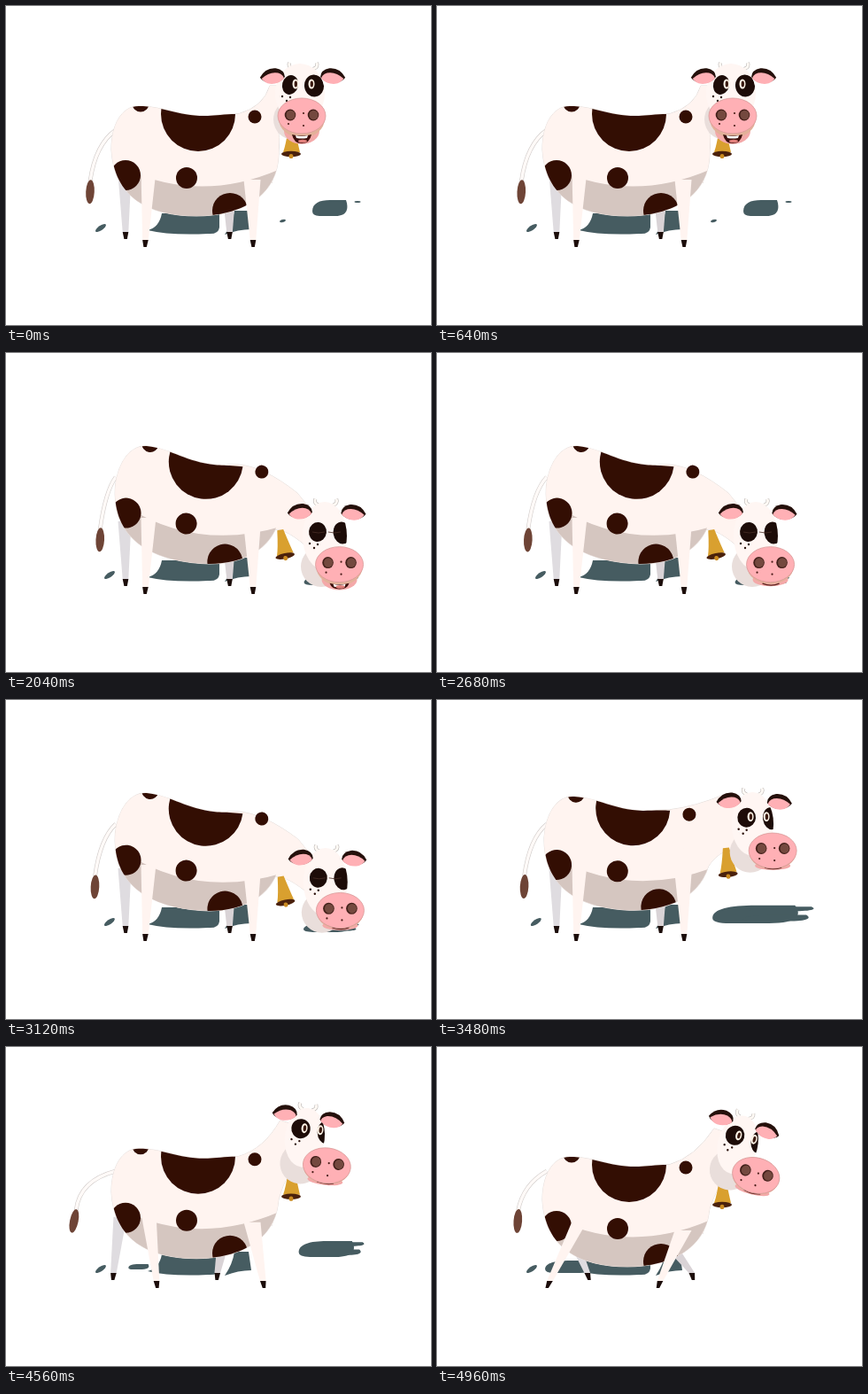
An HTML page with a canvas for the animation above (5 s loop, 480 px wide and 360 px high).

```html
<!DOCTYPE html>
<html lang="en">
<head>
<meta charset="utf-8">
<title>Cow</title>
<style>
html, body { margin: 0; width: 100%; height: 100%; overflow: hidden; background: #fff; }
canvas { display: block; }
</style>
</head>
<body>
<canvas id="stage" width="480" height="360"></canvas>
<script>
const ctx = document.getElementById('stage').getContext('2d');
const LOOP = 5000;
const HIDE = '#fff4f0', SHADE = '#d5c6c0', DARK = '#330e03', PINK = '#ffb0b5', SHADOW = '#465c61';

const TORSO = new Path2D(`M119 162 C119 135 130 113 150 113 C178 113 195 125 228 124
  C250 123 312 110 308 165 C308 215 265 237 215 237 C160 237 122 215 119 162 Z`);
const SPOTS = [[217, 122, 42], [204, 194, 12], [135, 191, 17], [253, 231, 20], [152, 110, 9.5]];

const clamp = v => Math.max(0, Math.min(1, v));
// Smooth 0 to 1 between two times
const ease = (t, from, to) => {
  const s = clamp((t - from) / (to - from));
  return s * s * (3 - 2 * s);
};
// Smooth 0 to 1 to 0 around a time
const bump = (t, mid, half) => Math.cos(clamp(Math.abs(t - mid) / half) * Math.PI / 2) ** 2;

function pose(t) {
  const bend = ease(t, 1080, 1700) - ease(t, 3080, 3860);
  const arc = Math.sin(Math.PI * bend);
  const look = ease(t, 700, 1120);
  const walk = ease(t, 4160, 5000);
  const phase = Math.max(0, t - 4000) / 1300 * 2 * Math.PI;
  const stride = Math.sin(phase);
  return {
    bend, arc, look, walk, stride,
    x: 334 + 9 * look + 22 * bend + 40 * bend * bend * arc + 6 * walk,
    y: 90 + 3 * look + 110 * bend ** 1.35 - 16 * bump(t, 300, 300),
    tilt: .25 * walk,
    turn: look - .45 * bend,
    mouth: 1 - ease(t, 1200, 3400),
    open: 1 - ease(t, 1150, 1350) + ease(t, 3200, 3450),
    drop: 11 * stride * stride * ease(t, 4160, 4660),
    lift: t > 4000 ? 18 * Math.max(0, stride) * Math.max(0, Math.cos(phase)) : 0,
    farStride: -stride * clamp((t - 4000) / 600),
    tailX: 95 + 16 * ease(t, 600, 1120) * clamp((4150 - t) / 3000)
      - 40 * (bump(t, 300, 300) + bump(t, 4720, 300)),
    backdrop: clamp(1.3 - Math.abs(t - 1440) / 250),
    shadowFade: 1 - ease(t, 4450, 4900)
  };
}

function fill(path, color) {
  ctx.fillStyle = color;
  ctx.fill(typeof path === 'string' ? new Path2D(path) : path);
}

function poly(color, ...pts) {
  fill('M' + pts.join('L') + 'Z', color);
}

function oval(x, y, rx, ry, color, angle = 0) {
  const path = new Path2D();
  path.ellipse(x, y, Math.max(0, rx), Math.max(0, ry), angle, 0, 7);
  fill(path, color);
  return path;
}

function line(d, color, width) {
  ctx.strokeStyle = color;
  ctx.lineWidth = width;
  ctx.stroke(new Path2D(d));
}

function within(place, paint) {
  ctx.save();
  place();
  paint();
  ctx.restore();
}

// The torso rocks forward around its middle as the neck bends
function rock(bend) {
  ctx.translate(215, 190);
  ctx.rotate(.13 * bend);
  ctx.translate(-215, -190);
}

function blob(x, y, w, h) {
  fill(`M${x - w} ${y + h * .4} C${x - w} ${y - h * .6} ${x - w * .6} ${y - h} ${x} ${y - h}
    H${x + w * .9} C${x + w * 1.05} ${y} ${x + w} ${y + h} ${x + w * .3} ${y + h}
    H${x - w * .6} Q${x - w} ${y + h} ${x - w} ${y + h * .4} Z`, SHADOW);
}

function drawShadows(p) {
  const x = 366, y = 228 + 29 * p.bend;
  const w = (20 + 24 * p.look + 20 * p.arc - 13 * p.bend) * p.shadowFade;
  const h = 9 + 3 * p.arc - 4 * p.bend;
  blob(x - w * .1 * p.look, y, w * (1 - .15 * p.look), h);
  blob(x + w * .4 * p.look, y - h * .6, w * .65 * p.look, h * .25);
  blob(x + w * .3 * p.look, y + h * .4, w * .65 * p.look, h * .35);
  oval(312.5, 242.5, 3.5 * (1 - p.look), 1.5 * (1 - p.look), SHADOW, -.3);
  oval(397, 221, 3.5 * (1 - p.look), 1 - p.look, SHADOW);
  fill('M160 253 Q173 250 176 234 H241 V250 Q240 258 228 257 Q185 259 160 253 Z', SHADOW);
  fill('M247 258 Q256 245 258 231 H274 L277 252 Q262 252 247 258 Z', SHADOW);
  oval(107 + 10 * p.bend, 250.5, 7, 2.6, SHADOW, -.6);
  const step = Math.abs(p.stride);
  blob(150, 248, 28 * step, 7 * step);
}

function drawBackdrop(alpha) {
  ctx.globalAlpha = alpha;
  poly('#8fb5c6', [305, 172], [323, 178], [317, 200], [314, 215], [316, 232], [290, 232], [299, 208]);
  poly('#8fb5c6', [373, 212], [396, 212], [398, 231], [378, 232]);
  poly('#8fb5c6', [121, 156], [126, 190], [118, 192], [116, 182]);
  ctx.globalAlpha = 1;
}

function drawTail({ tailX: x, stride, walk }) {
  const y = 211 - .02 * (103 - x) ** 2 - 12 * walk * stride * stride;
  const lean = Math.max(0, (94 - x) / 45);
  const d = `M124 140 Q${x + 6} ${156 - 14 * lean} ${x + 6 * lean} ${y - 12}`;
  line(d, '#cfcac8', 4.6);
  line(d, '#fffaf8', 3.4);
  oval(x, y, 4.8, 13.5, '#6e4436', .05 + lean * .4);
}

function drawLeg(x, y, w, fx, fy, color) {
  const lean = (fx - x) * .09, ankle = fx - lean, top = fy - 8;
  poly(color, [x - w / 2, y], [x + w / 2, y], [ankle + 3.4, top], [ankle - 3.2, top]);
  poly('#1c0d0a', [ankle - 3.2, top], [ankle + 3.4, top], [fx + 1.8, fy], [fx - 1.6, fy]);
}

function drawBody({ x, y, bend, look }) {
  const neck = new Path2D(`M250 ${123 + 3 * bend} L262 ${122 + 4 * bend}
    Q291 ${114 + 14 * bend} ${x - 36} ${y - 12 * look * (1 - bend) - 45 * bend}
    L${x} ${y} L${x - 27} ${y + 52 - 38 * bend}
    Q312 ${150 + 45 * bend} 300 200 Z`);
  const turned = () => rock(bend);
  ctx.strokeStyle = '#e3dcd9';
  ctx.lineWidth = 1;
  within(turned, () => ctx.stroke(TORSO));
  ctx.stroke(neck);
  within(turned, () => fill(TORSO, HIDE));
  fill(neck, HIDE);
  within(turned, () => {
    oval(281, 125, 7.5, 7.5, DARK);
    ctx.clip(TORSO);
    fill('M135 184 Q222 224 314 182 V270 H135 Z', SHADE);
    for (const [sx, sy, r] of SPOTS) oval(sx, sy, r, r, DARK);
  });
}

function drawBell(bend) {
  within(() => {
    ctx.translate(322 + 40 * bend * (1 - bend) - 6 * bend, 171 + 62 * bend);
    ctx.rotate(-.2 * bend);
  }, () => {
    fill('M-3 -34 H4 Q8 -14 10 -6 H-9 Q-6 -14 -3 -34 Z', '#d9a02f');
    oval(0, -4, 11, 3.2, '#4a210c');
    oval(0, -1.5, 2.4, 2.6, '#c98a20');
  });
}

function drawEar(x, y, side) {
  within(() => {
    ctx.translate(x, y);
    ctx.scale(side, 1);
    ctx.rotate(.08);
  }, () => {
    fill('M-14 3 Q-9 -9 3 -9 Q13 -8 14 0 Q9 8 -1 8 Q-10 8 -14 3 Z', '#25100b');
    fill('M-12 4 Q-4 -5 6 -4 Q13 -2 13 2 Q7 9 -2 9 Q-8 9 -12 4 Z', PINK);
  });
}

function drawMuzzle(turn, mouth) {
  oval(0, 17, 20, 5 + 10 * mouth, '#f4a9a9');
  oval(0, 3, 26, 18 + 4 * mouth, '#e3b199');
  if (mouth > .35) {
    const low = 21 + 10 * mouth;
    fill(`M-11 21 Q0 24 11 21 Q9 ${low} 0 ${low} Q-9 ${low} -11 21 Z`, '#3c100c');
    fill('M-7 22 Q0 24 7 22 L6 25 Q0 26 -6 25 Z', '#fff');
    oval(1, low - 2.5, 5, 1.8, '#e2807c');
  } else {
    line(`M-9 ${19 + 10 * mouth} Q1 ${22 + 14 * mouth} 10 ${19 + 10 * mouth}`, '#5a231c', 1.3);
  }
  const snout = oval(0, 0, 27, 20, PINK);
  ctx.strokeStyle = '#d99a98';
  ctx.lineWidth = .8;
  ctx.stroke(snout);
  for (const side of [-13, 13]) {
    oval(side, -1 - 2 * turn, 6.3, 6.5, '#43201a');
    oval(side + .5, -1 - 2 * turn, 5, 5.3, '#74493f');
  }
  for (const [x, y] of [[2, -3], [2, 11], [-15, 9]]) oval(x, y, 1.1, 1.1, '#4a1d18');
}

function drawFace({ turn, bend, mouth, open }) {
  const lift = 10 * bend, right = 26 - 11 * turn;
  oval(-9, 38, 23, 23, '#e9dedb');

  const hornY = -22 - 4 * turn - lift;
  for (const [x, s] of [[-13 - 3 * turn, 1], [16 - 16 * turn, -1]]) {
    const d = `M${x + 3 * s} ${hornY + 3} Q${x - 3 * s} ${hornY + 1} ${x - s} ${hornY - 4}`;
    line(d, '#b9b4b2', 4);
    line(d, '#fffaf5', 2.8);
  }

  const face = oval((right - 30) / 2, 8.5 - lift / 2, (right + 30) / 2, 33.5 + lift / 2, '#fff6f3');
  within(() => ctx.clip(face), () => {
    oval(-13, -1, 9 + 1.7 * turn, 11, '#1d0c08', .25 * (1 - turn));
    oval(14 + turn, 0, 11 - 2 * turn, 12.5, '#1d0c08', -.15);
  });

  for (const x of [-7 - 2 * turn, 11 - 2 * turn]) {
    if (open > .25) {
      oval(x, -2, 3.5, 5.5 * open, '#fff5e8');
      oval(x + .3, -2, 1.7, 3.5 * open, '#3a1a10');
    } else {
      line(`M${x - 11} -1 Q${x - 4} 1 ${x + 3} -1`, '#4a2f28', .8);
    }
  }
  for (const [x, y] of [[-22, 12], [-13, 13], [-17, 17]]) oval(x, y, 1.2, 1.2, '#2b120c');

  const earY = -11 - 6 * turn - lift;
  drawEar(-33, earY, 1);
  drawEar(35 - 14 * turn, earY + 2 * turn, -1);
  within(() => ctx.translate(21 * turn, 34 + 3 * turn), () => drawMuzzle(turn, mouth));
}

function draw(t) {
  const p = pose(t);
  const raised = () => ctx.translate(0, p.drop);
  const near = 33 * p.stride, far = 37 * p.farStride, nearY = 272 - p.lift;

  ctx.fillStyle = '#fff';
  ctx.fillRect(0, 0, 480, 360);
  drawShadows(p);
  drawBackdrop(p.backdrop);
  drawTail(p);
  drawLeg(134 + far * .35, 190 + p.drop, 15, 135 + far, 263, '#dfdce0');
  drawLeg(252 + far * .5, 222 + p.drop, 13, 252.5 + far, 263, '#d9d3d6');
  within(raised, () => drawBody(p));
  drawLeg(161, 186 + p.drop, 17, 157 + near, nearY, HIDE);
  drawLeg(278, 196 + p.drop, 19, 279 + near * .9, nearY, HIDE);
  within(raised, () => {
    drawBell(p.bend);
    ctx.translate(p.x, p.y);
    ctx.rotate(p.tilt);
    drawFace(p);
  });
}

function tick() {
  draw(performance.now() % LOOP);
  requestAnimationFrame(tick);
}
tick();
</script>
</body>
</html>
```
